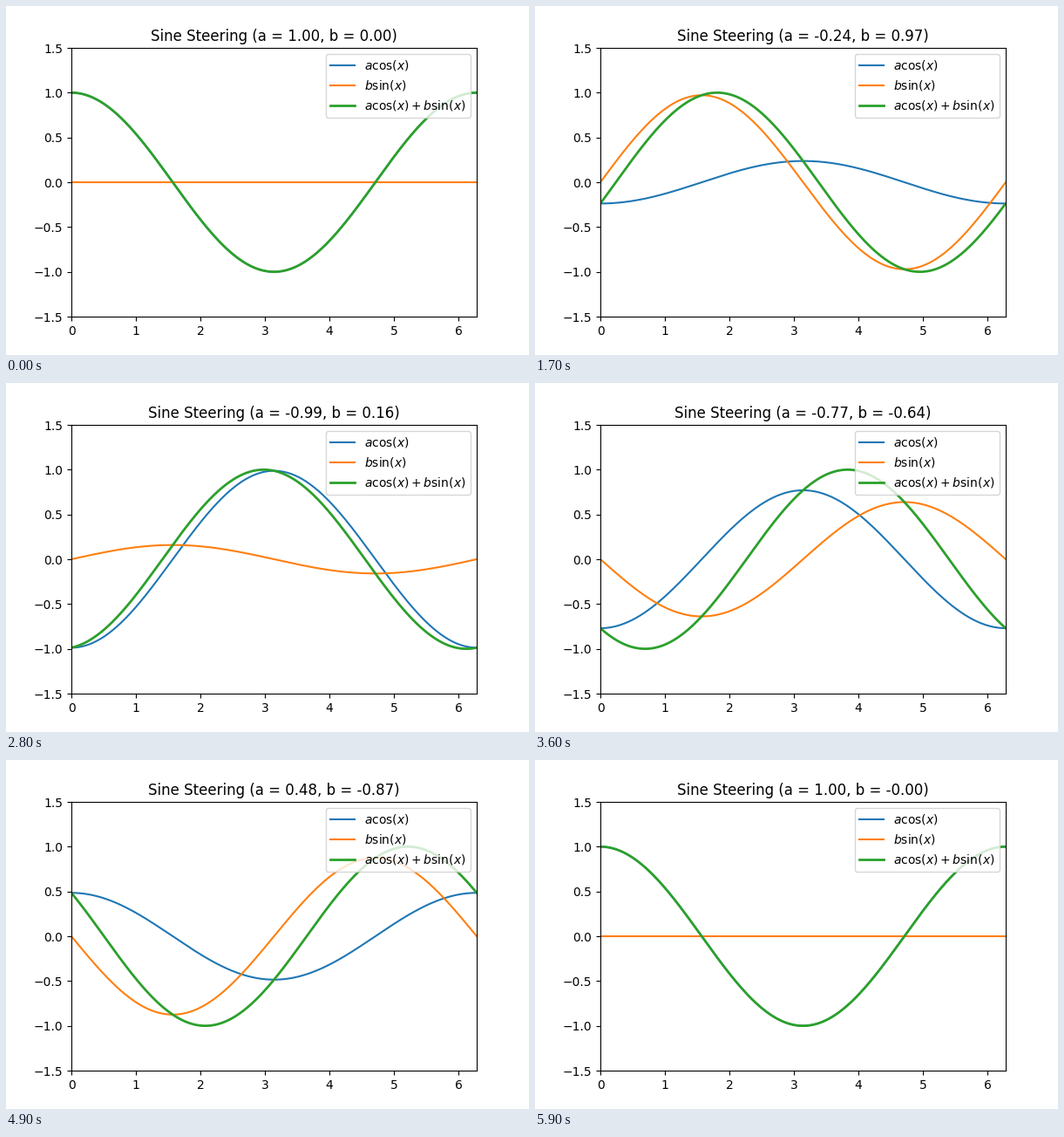
Write a matplotlib script that moves like this. It is 600 px wide and 400 px high and loops after 6000 ms.

```python
import numpy as np
import matplotlib.pyplot as plt
from matplotlib.animation import FuncAnimation

FRAMES = 60
INTERVAL = 100

x = np.linspace(0, 2 * np.pi, 400)
angles = np.linspace(0, 2 * np.pi, FRAMES)

fig, ax = plt.subplots(figsize=(6, 4), dpi=100)
ax.set_xlim(0, 2 * np.pi)
ax.set_ylim(-1.5, 1.5)

cos_line, = ax.plot([], [], label=r"$a\cos(x)$")
sin_line, = ax.plot([], [], label=r"$b\sin(x)$")
sum_line, = ax.plot([], [], lw=2, label=r"$a\cos(x) + b\sin(x)$")
ax.legend(loc="upper right")
title = ax.set_title("")


def update(i):
    a, b = np.cos(angles[i]), np.sin(angles[i])
    cos_part, sin_part = a * np.cos(x), b * np.sin(x)
    cos_line.set_data(x, cos_part)
    sin_line.set_data(x, sin_part)
    sum_line.set_data(x, cos_part + sin_part)
    title.set_text(f"Sine Steering (a = {a:.2f}, b = {b:.2f})")
    return cos_line, sin_line, sum_line, title


anim = FuncAnimation(fig, update, frames=FRAMES, interval=INTERVAL,
                     repeat=True, repeat_delay=0)
plt.show()
```
